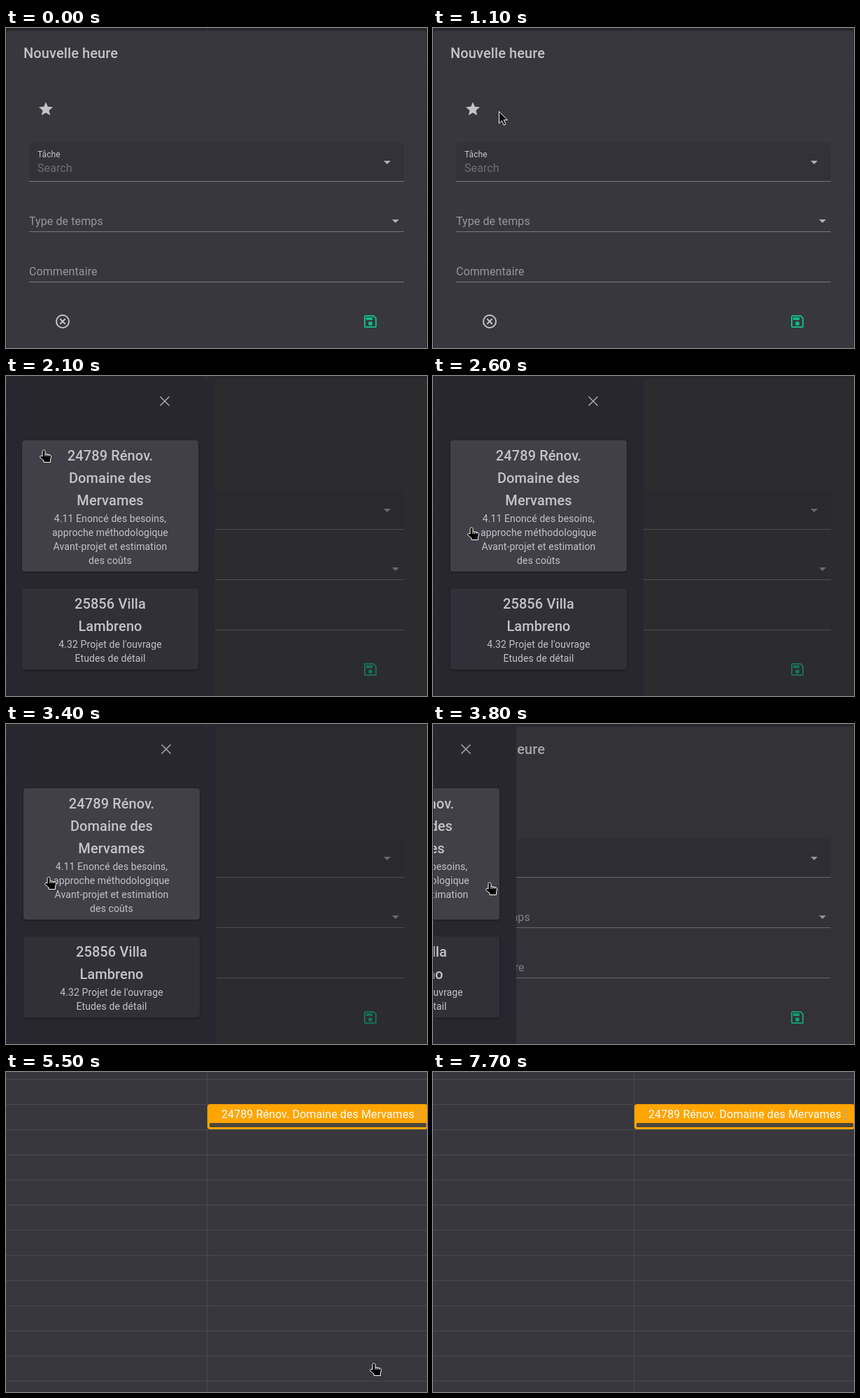
Recreate the animation shown at these times as an HTML page. Size 602 px wide and 458 px high, loop 7.9 s.

```html
<!DOCTYPE html>
<html lang="fr">
<head>
<meta charset="utf-8">
<title>Nouvelle heure</title>
<style>
  html, body { margin: 0; width: 100%; height: 100%; overflow: hidden; background: #38373d; }
  svg { display: block; width: 602px; height: 458px; }
  text { font-family: Roboto, "Open Sans", sans-serif; font-size: 16px; letter-spacing: .1px; fill: #c4c4c6; }
  .title { font-size: 20px; font-weight: 500; }
  .small { font-size: 12px; }
  .label { fill: #98979b; }
  .hint { fill: #6f6e72; }
  .icon { fill: #c4c4c6; }
  .arrow { fill: #b0b0b2; }
  .cross { stroke: #a4a4a6; stroke-width: 1.6; }
  .line { stroke: #79787c; }
  .line.over { stroke: #a3a2a6; stroke-width: 2; }
  .grid { stroke: #4a494f; }
  .card rect { fill: #312f38; filter: drop-shadow(0 1px 1.5px rgba(0, 0, 0, .35)); }
  .card.over rect { fill: #413f47; }
  .card text { text-anchor: middle; font-size: 14px; }
  .card .title { font-size: 20px; }
  #cursor { fill: #000; stroke: #fff; stroke-linejoin: round; }
</style>
</head>
<body>
<svg viewBox="0 0 602 458">
  <defs>
    <clipPath id="frame"><rect x="1" y="4" width="600" height="460" rx="4"/></clipPath>
  </defs>

  <rect width="602" height="458" fill="#38373d"/>
  <path id="rows" class="grid"/>
  <g id="event">
    <rect x="288" y="46" width="315" height="36" rx="4" fill="#ffa500"/>
    <rect x="291" y="73" width="310" height="6" rx="1.5" fill="#4b453d"/>
    <text x="308" y="66" style="fill:#fff">24789 Rénov. Domaine des Mervames</text>
    <path d="M590 56V68" stroke="#b3a795" stroke-width="3.6" stroke-linecap="round" stroke-dasharray="0 5.5"/>
  </g>
  <rect id="backdrop" width="602" height="458"/>

  <g id="dialog" clip-path="url(#frame)">
    <rect x="1" y="4" width="600" height="460" fill="#38373d"/>
    <text class="title" x="25" y="43">Nouvelle heure</text>
    <path class="icon" transform="translate(45 104)" d="M12 17.3 18.2 21l-1.7-7L22 9.200l-7.200-.6L12 2 9.200 8.600 2 9.200l5.500 4.800L5.800 21z"/>

    <path fill="#333239" d="M33 219V168q0-4 4-4H565q4 0 4 4V219z"/>
    <text class="small" x="45" y="185">Tâche</text>
    <text id="search" class="hint" x="45" y="206">Search</text>
    <g id="task">
      <text x="45" y="206">Avant-projet et estimation des coûts - 4.11 Enoncé des besoin...</text>
      <path class="cross" d="M506 187l10 10m0-10l-10 10"/>
    </g>
    <path class="arrow" d="M540 190h10l-5 5z"/>

    <text id="kindLabel" class="label" x="33" y="282">Type de temps</text>
    <g id="kind">
      <text class="small" x="33" y="256">Type de temps</text>
      <text x="33" y="281">Travail</text>
    </g>
    <path class="arrow" d="M552 274h10l-5 5z"/>

    <text class="label" x="33" y="354">Commentaire</text>
    <path class="line" d="M33 219.5H569"/>
    <path class="line" d="M33 291.5H569"/>
    <path class="line" d="M33 363.5H569"/>

    <g fill="none" stroke="#c4c4c6" stroke-width="2">
      <circle cx="81" cy="420" r="9"/>
      <path d="M77.300 416.300l7.400 7.400m0-7.400l-7.400 7.400"/>
    </g>
    <g transform="translate(509 408)" fill="#12b886">
      <path d="M4 5q0-1 1-1H16.600L20 7.400V19q0 1-1 1H5q-1 0-1-1z" fill="none" stroke="#12b886" stroke-width="2"/>
      <rect x="6" y="6" width="9" height="4"/>
      <circle cx="12" cy="15" r="3"/>
    </g>

    <rect id="dim" x="1" y="4" width="600" height="460" fill="#212121"/>
    <g id="drawer">
      <rect x="1" y="4" width="300" height="460" fill="#28262f"/>
      <path class="cross" d="M222.500 29.500l13 13m0-13l-13 13"/>
      <g class="card">
        <rect x="25" y="92" width="252" height="188" rx="4"/>
        <text class="title" x="151" y="121">24789 Rénov.</text>
        <text class="title" x="151" y="153">Domaine des</text>
        <text class="title" x="151" y="185">Mervames</text>
        <text x="151" y="209">4.11 Enoncé des besoins,</text>
        <text x="151" y="229">approche méthodologique</text>
        <text x="151" y="249">Avant-projet et estimation</text>
        <text x="151" y="269">des coûts</text>
      </g>
      <g class="card">
        <rect x="25" y="304" width="252" height="116" rx="4"/>
        <text class="title" x="151" y="333">25856 Villa</text>
        <text class="title" x="151" y="365">Lambreno</text>
        <text x="151" y="389">4.32 Projet de l'ouvrage</text>
        <text x="151" y="409">Etudes de détail</text>
      </g>
    </g>
  </g>

  <g id="cursor">
    <path id="pointer" d="M.5.5V17.500L4.500 13.700 7.300 20 10 18.800 7.200 12.700H12.300z"/>
    <g id="hand">
      <path d="M-3 1.500C-3-.5 1-.5 1 1.500V5.500L8 7Q10 7.500 9.500 10L8.500 14V17.500H-1V15L-6 11C-7.500 9-5 7.500-3 9z"/>
      <path d="M1 5.500V9M3.700 6V9M6.400 6.600V9" fill="none"/>
    </g>
  </g>
</svg>

<script>
const LOOP = 7900, STEP = 100;
const $ = id => document.getElementById(id);
const all = sel => [...document.querySelectorAll(sel)];
const show = (id, on) => { $(id).style.display = on ? "" : "none"; };
const clamp = v => Math.min(1, Math.max(0, v));
const span = (t, from, to) => clamp((t - from) / (to - from));
const smooth = p => p * p * (3 - 2 * p);
const easeOut = p => 1 - (1 - p) ** 3.2;
const lines = all(".line"), cards = all(".card");

// Pointer moves: start, end, x and y reached
const moves = [
  [600, 1100, 94, 119],
  [1100, 1400, 55, 106],
  [2300, 3000, 58, 388],
  [3000, 3400, 62, 219],
  [3700, 4500, 538, 409],
  [4500, 4900, 527, 417],
  [6800, 6900, 569, 283]
];

let d = "M287.5 0V458";
for (let y = 10.5; y < 458; y += 36) d += `M0 ${y}H602`;
$("rows").setAttribute("d", d);

function pointerAt(t) {
  let x = 236, y = 398;
  for (const [from, to, toX, toY] of moves) {
    const p = smooth(span(t, from, to));
    x += (toX - x) * p;
    y += (toY - y) * p;
  }
  return [Math.round(x), Math.round(y)];
}

function render(t) {
  const [x, y] = pointerAt(t);
  const isHand = t >= 1300 && t < 6900;
  show("cursor", t >= 600 && t < 7000);
  show("hand", isHand);
  show("pointer", !isHand);
  $("cursor").setAttribute("transform", `translate(${x} ${y})`);

  const open = easeOut(span(t, 1785, 2185)) - easeOut(span(t, 3700, 4100));
  $("drawer").setAttribute("transform", `translate(${Math.round(-302 * (1 - open))} 0)`);
  $("dim").style.opacity = .48 * open;

  lines.forEach((line, i) => {
    const bottom = 219 + 72 * i;
    line.classList.toggle("over", t >= 600 && t < 1100 && y <= bottom && y > bottom - 55);
  });
  cards[0].classList.toggle("over", y < 280);
  cards[1].classList.toggle("over", y >= 304);

  const hasTask = t >= 3900, hasKind = t >= 4000;
  show("task", hasTask);
  show("search", !hasTask);
  show("kind", hasKind);
  show("kindLabel", !hasKind);

  $("dialog").style.opacity = 1 - span(t, 5100, 5300);
  $("backdrop").style.opacity = .28 * (1 - span(t, 5100, 5500));
  show("event", t >= 5400);
}

let start;
function tick(now) {
  start ??= now;
  const t = (now - start) % LOOP;
  render(Math.floor(t / STEP + .001) * STEP);
  requestAnimationFrame(tick);
}
render(0);
requestAnimationFrame(tick);
</script>
</body>
</html>
```
